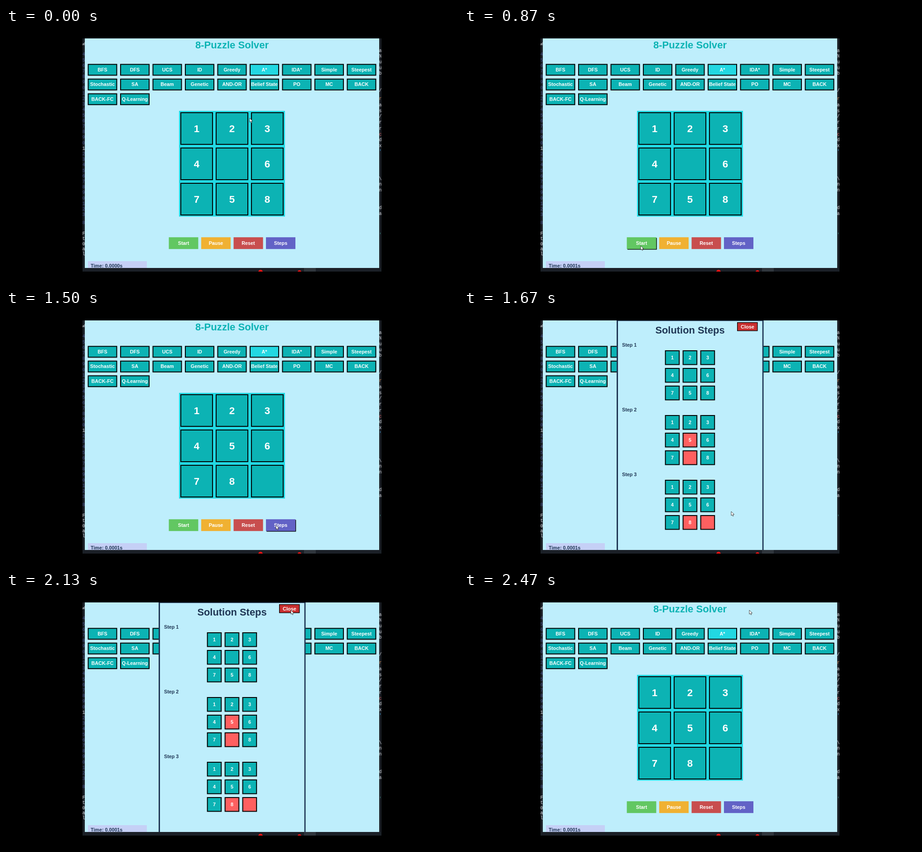
These frames come from a looping animation (998 px wide and 561 px high, 2510 ms). An HTML page with a canvas:

```html
<!DOCTYPE html>
<html lang="en">
<head>
<meta charset="utf-8">
<title>8-Puzzle Solver</title>
<style>
html, body { margin: 0; width: 100%; height: 100%; overflow: hidden; background: #000; }
canvas { display: block; }
</style>
</head>
<body>
<canvas id="stage" width="998" height="561"></canvas>
<script>
const ctx = document.getElementById('stage').getContext('2d');
const LOOP = 2510;
const TEAL = '#0cb3b4', CYAN = '#22d8e2', PAGE = '#beeefc', INK = '#1f3654', RED = '#ff6060';
const SANS = '"Liberation Sans", Arial, sans-serif';
const MONO = '"Liberation Mono", monospace';

const METHODS = ['BFS', 'DFS', 'UCS', 'ID', 'Greedy', 'A*', 'IDA*', 'Simple', 'Steepest',
  'Stochastic', 'SA', 'Beam', 'Genetic', 'AND-OR', 'Belief State', 'PO', 'MC', 'BACK',
  'BACK-FC', 'Q-Learning'];
const CONTROLS = [['Start', '#62c762'], ['Pause', '#f0b132'], ['Reset', '#c84e4e'], ['Steps', '#6262c6']];
const BOARDS = ['1234 6758', '1234567 8', '12345678 '];
const CHANGED = [[], [4, 7], [7, 8]];

// Times of the state changes
const SOLVED = 600, MOVES = [890, 1130], OPEN = 1550, CLOSE = 2260;

// Pointer path: time, x, y
const PATH = [[0, 538, 199], [60, 530, 215], [320, 390, 486], [600, 390, 486], [700, 390, 481],
  [1080, 390, 481], [1270, 543, 478], [1400, 596, 478], [1570, 596, 474], [1670, 590, 445],
  [1800, 590, 430], [2060, 629, 40], [LOOP, 630, 40]];

function rect(x, y, w, h, fill) {
  ctx.fillStyle = fill;
  ctx.fillRect(x, y, w, h);
}

function box(x, y, w, h, fill, border = 2) {
  rect(x, y, w, h, '#000');
  rect(x + border, y + border, w - 2 * border, h - 2 * border, fill);
}

function text(str, x, y, color = '#fff', size = 10.75, align = 'center') {
  ctx.font = `bold ${size}px ${SANS}`;
  ctx.textAlign = align;
  ctx.fillStyle = color;
  ctx.fillText(str, x, y + size * 0.355);
}

function pointerAt(t) {
  const i = PATH.findIndex(p => p[0] > t);
  const [t0, x0, y0] = PATH[i - 1], [t1, x1, y1] = PATH[i];
  const u = (t - t0) / (t1 - t0), k = u * u * (3 - 2 * u);
  return [x0 + (x1 - x0) * k, y0 + (y1 - y0) * k];
}

function code(str, x, y, color = '#d8dce2') {
  ctx.fillStyle = color;
  ctx.fillText(str, x, y + 3);
}

// Slivers of the editor and taskbar around the window
function drawDesktop() {
  ctx.save();
  ctx.beginPath();
  ctx.rect(169, 23, 660, 515);
  ctx.clip();
  rect(169, 23, 660, 515, '#1b2027');
  ctx.font = `10px ${MONO}`;
  ctx.textAlign = 'left';
  code('w', 168, 35);
  for (let n = -3; n < 27; n++) {
    code((n + 17) % 10, 168.5, 95 + n * 12.2, n === 14 ? '#d8dce2' : '#46568a');
  }
  code('8', 168.5, 430, '#46568a');
  [...'Ft0al'].forEach((c, i) => code(c, 168.5, 454 + i * 11.3));
  const tails = { 50: 'a', 62: '%', 75: 'u', 88: 'u', 100: 'b', 138: '/', 170: 'an', 183: 's', 195: '/',
    208: 're', 222: 'r', 247: 'd.', 260: 'xt', 333: '\\', 345: 'n', 358: 'n', 397: 'd', 410: 'an' };
  for (const y in tails) code(tails[y], 823.5, +y);
  code('r', 823.5, 156, '#c88a5a');
  code('c', 823.5, 235, '#d06060');
  code("'", 823.5, 273, '#4aa8e0');
  code("'", 823.5, 457, '#3f8f80');
  rect(658, 530, 26, 8, '#30363d');
  for (const [x, r] of [[562, 5], [648, 4]]) {
    ctx.fillStyle = '#f01414';
    ctx.beginPath();
    ctx.arc(x, 539, r, 0, 7);
    ctx.fill();
  }
  ctx.restore();
}

function drawGrid(board, x, y, pitch, size, fontSize, changed = []) {
  [...board].forEach((digit, i) => {
    const tx = x + i % 3 * pitch, ty = y + Math.floor(i / 3) * pitch;
    box(tx, ty, size, size, changed.includes(i) ? RED : TEAL);
    text(digit, tx + size / 2, ty + size / 2, '#fff', fontSize);
  });
}

function drawMain(t, px, py) {
  text('8-Puzzle Solver', 499, 37.5, TEAL, 22.1);
  METHODS.forEach((name, i) => {
    const x = 180.5 + i % 9 * 71.5, y = 79.3 + Math.floor(i / 9) * 32.5;
    box(x, y, 65, 26, name === 'A*' ? CYAN : TEAL);
    text(name, x + 32.5, y + 12.7);
  });
  rect(382, 183, 234, 233.5, CYAN);
  drawGrid(BOARDS[MOVES.filter(m => t >= m).length], 385, 186, 78, 72, 22.3);
  CONTROLS.forEach(([name, color], i) => {
    const x = 359.5 + i * 71.5, y = 462.2;
    if (px > x && px < x + 65 && py > y && py < y + 26) rect(x + 1.3, y + 1.3, 65, 26, '#000');
    rect(x, y, 65, 26, color);
    text(name, x + 32.5, y + 12.8);
  });
  rect(181, 515, 130, 15, '#c5d0f6');
  text(`Time: 0.000${t < SOLVED ? 0 : 1}s`, 187, 525.5, INK, 10.75, 'left');
}

function drawSteps() {
  rect(337, 23, 324.5, 507, INK);
  rect(340, 24.3, 318.7, 505.7, PAGE);
  text('Solution Steps', 499, 44, INK, 21.9);
  box(603, 27, 45.5, 19.5, '#c93030', 1.3);
  text('Close', 626, 36.7, '#fff', 11);
  BOARDS.forEach((board, i) => {
    const y = i * 143;
    text(`Step ${i + 1}`, 349, 77.5 + y, INK, 10.75, 'left');
    drawGrid(board, 443.7, 89 + y, 39, 32.5, 10.75, CHANGED[i]);
  });
}

function drawPointer(x, y) {
  ctx.beginPath();
  [[0, 0], [0, 9], [2, 7.3], [3.6, 10.4], [5, 9.7], [3.8, 6.7], [6.6, 6.5]]
    .forEach(([dx, dy]) => ctx.lineTo(x + dx, y + dy));
  ctx.closePath();
  ctx.fillStyle = '#fff';
  ctx.fill();
  ctx.strokeStyle = '#222';
  ctx.lineWidth = 0.8;
  ctx.stroke();
}

function draw() {
  const t = performance.now() % LOOP;
  const [px, py] = pointerAt(t);
  rect(0, 0, 998, 561, '#000');
  drawDesktop();
  ctx.save();
  ctx.beginPath();
  ctx.rect(174, 23, 650, 507);
  ctx.clip();
  rect(174, 23, 650, 507, PAGE);
  drawMain(t, px, py);
  if (t >= OPEN && t < CLOSE) drawSteps();
  ctx.restore();
  drawPointer(px, py);
  requestAnimationFrame(draw);
}
draw();
</script>
</body>
</html>
```
